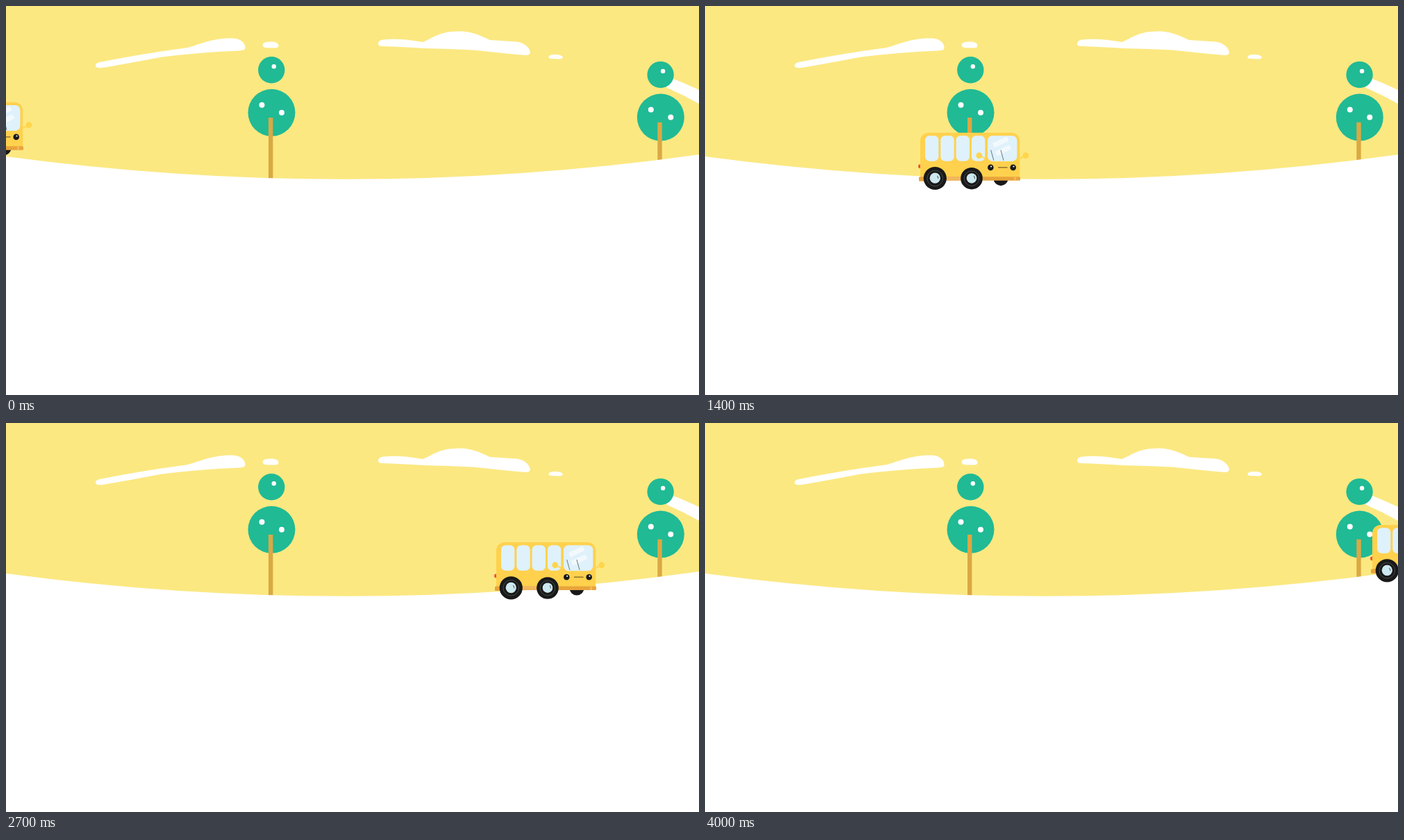
Animation, 998 px wide and 561 px high, one loop 4100 ms. Source, as an HTML page with a canvas:

```html
<!DOCTYPE html>
<html lang="en">
<head>
<meta charset="utf-8">
<title>Bus ride</title>
<style>
  html, body { margin: 0; width: 100%; height: 100%; overflow: hidden; background: #fff; }
  canvas { display: block; }
</style>
</head>
<body>
<canvas id="stage" width="998" height="561"></canvas>
<script>
const ctx = document.getElementById('stage').getContext('2d');
const LOOP = 4100, STEP = 100;

// Bus route: [time, left, top] of the body
const ROUTE = [
  [0, -119, 138.7], [600, 52.5, 167], [800, 112, 171], [1200, 232.5, 180],
  [1400, 310, 182.7], [1800, 465.5, 186.5], [2200, 572.5, 182.7], [2400, 626.5, 180],
  [2700, 706, 172], [3000, 818.5, 161], [3200, 852, 158.8], [3600, 910, 153], [4000, 961, 147]
];

const CLOUDS = [
  'M129 86Q129 82 135 81Q195 69 262 60C283 54 297 46.5 325 46.5C339 46.5 345 54 344.5 61Q344 64 336 64.5Q320 65 305 66Q250 70 222 74Q170 84 139 89Q129 90 129 86Z',
  'M369.5 56C370 52 378 51.5 381 51.5C388 51.5 392 53 392.5 57Q392 60.5 388 60.5L374 60.3Q369.5 59.5 369.5 56Z',
  'M536 54.5Q536 50 542 48.7Q565 45.5 600 52C612 48 623 36.5 652 36.5C674 36.5 687 45 697 49Q715 50 735 51.5C747 53 754 60 755 67Q755 71 748 71Q715 68 673 63.5Q638 61.5 602 61Q570 59 542 58Q536 58 536 54.5Z',
  'M781.5 73Q783 70 790 70Q801 70 802 74Q801 76.5 797 76.5L785 76Q781 76 781.5 73Z',
  'M945 99Q968 107 998 121V141Q975 128 952 118Z'
].map(d => new Path2D(d));

function disc(x, y, r, color) {
  ctx.fillStyle = color;
  ctx.beginPath();
  ctx.arc(x, y, r, 0, Math.PI * 2);
  ctx.fill();
}

function box(x, y, w, h, r, color) {
  ctx.fillStyle = color;
  ctx.beginPath();
  ctx.roundRect(x, y, w, h, r);
  ctx.fill();
}

function line(x1, y1, x2, y2, width, color) {
  ctx.strokeStyle = color;
  ctx.lineWidth = width;
  ctx.beginPath();
  ctx.moveTo(x1, y1);
  ctx.lineTo(x2, y2);
  ctx.stroke();
}

function tree(dx, dy, bottom) {
  const green = '#20ba95';
  disc(382.3 + dx, 92.3 + dy, 19.2, green);
  disc(382.5 + dx, 153.8 + dy, 34, green);
  disc(368.5 + dx, 142.8 + dy, 4, '#fff');
  disc(397 + dx, 153.8 + dy, 4, '#fff');
  disc(385.8 + dx, 87.2 + dy, 3.2, '#fff');
  box(378 + dx, 161 + dy, 6.4, bottom - 161 - dy, 0, '#dba843');
}

function scenery() {
  ctx.fillStyle = '#fbe881';
  ctx.fillRect(0, 0, 998, 561);
  ctx.fillStyle = '#fff';
  CLOUDS.forEach(cloud => ctx.fill(cloud));
  tree(0, 0, 252);
  tree(560.3, 6.8, 225);
  ctx.fillStyle = '#fff';
  ctx.beginPath();
  ctx.moveTo(0, 217);
  ctx.quadraticCurveTo(499, 284, 998, 214.3);
  ctx.lineTo(998, 561);
  ctx.lineTo(0, 561);
  ctx.fill();
}

function wheel(x, y, r) {
  disc(x, y, r, '#191919');
  ctx.strokeStyle = '#5a5f60';
  ctx.lineWidth = 0.7;
  ctx.beginPath();
  ctx.arc(x, y, r * 0.68, 0, Math.PI * 2);
  ctx.stroke();
  disc(x, y - 0.3, r * 0.46, '#cde8ef');
  ctx.strokeStyle = '#53696f';
  ctx.lineWidth = 1.1;
  ctx.beginPath();
  ctx.arc(x - 1, y, 5.5, -0.75, 0.1);
  ctx.stroke();
}

function mirror(x, y, armX, armY) {
  line(x, y, armX, armY, 1.8, '#ffd54c');
  disc(x, y, 4.4, '#ffd54c');
}

function eye(x) {
  disc(x, 50.2, 4.3, '#191919');
  disc(x + 0.8, 48.8, 1.1, '#fff');
}

function shine(x, y, length) {
  ctx.save();
  ctx.translate(x, y);
  ctx.rotate(-0.44);
  box(-length / 2, -3.5, length, 7, 1.5, 'rgba(255,255,255,.6)');
  ctx.restore();
}

function bus(x, y) {
  const glass = '#dff1fb';
  ctx.save();
  ctx.translate(x, y);
  disc(116, 66, 10.5, '#191919');
  disc(0, 48.5, 3, '#f0503f');
  box(0, 0, 143.3, 66, [12, 12, 2, 2], '#ffd14d');

  box(-2, 63.5, 146, 5.5, 1.5, '#e9a43b');
  box(-2, 64.5, 8, 5.5, 1.5, '#e9a43b');
  box(38, 63.5, 20, 5, 0, '#f2b75d');
  box(135, 63.5, 3, 5.5, 0, '#f2b75d');

  for (let i = 0; i < 4; i++) box(7 + i * 22.3, 4.2, 19.4, 36.8, 6.5, glass);
  box(97, 4.2, 42.4, 37, 7, glass);
  shine(115.8, 13.5, 23);
  shine(119.5, 25.5, 23);
  line(101.7, 25, 105.8, 40, 0.9, '#5d686c');
  line(115.9, 25, 120, 40, 0.9, '#5d686c');

  mirror(84.8, 33, 95, 37.5);
  mirror(151.8, 33, 142.5, 37.5);
  eye(101.3);
  eye(133.7);
  line(112, 50.2, 125.5, 50.2, 1, '#54441c');
  wheel(21.3, 65.8, 16.6);
  wheel(74, 66, 15.8);
  ctx.restore();
}

function position(t) {
  const i = Math.max(1, ROUTE.findIndex(point => point[0] >= t));
  const [t0, x0, y0] = ROUTE[i - 1];
  const [t1, x1, y1] = ROUTE[i];
  const k = (t - t0) / (t1 - t0);
  return [x0 + (x1 - x0) * k, y0 + (y1 - y0) * k];
}

const start = performance.now();
function draw() {
  const elapsed = (performance.now() - start) % LOOP;
  scenery();
  bus(...position(Math.floor(elapsed / STEP) * STEP));
  requestAnimationFrame(draw);
}
draw();
</script>
</body>
</html>
```
